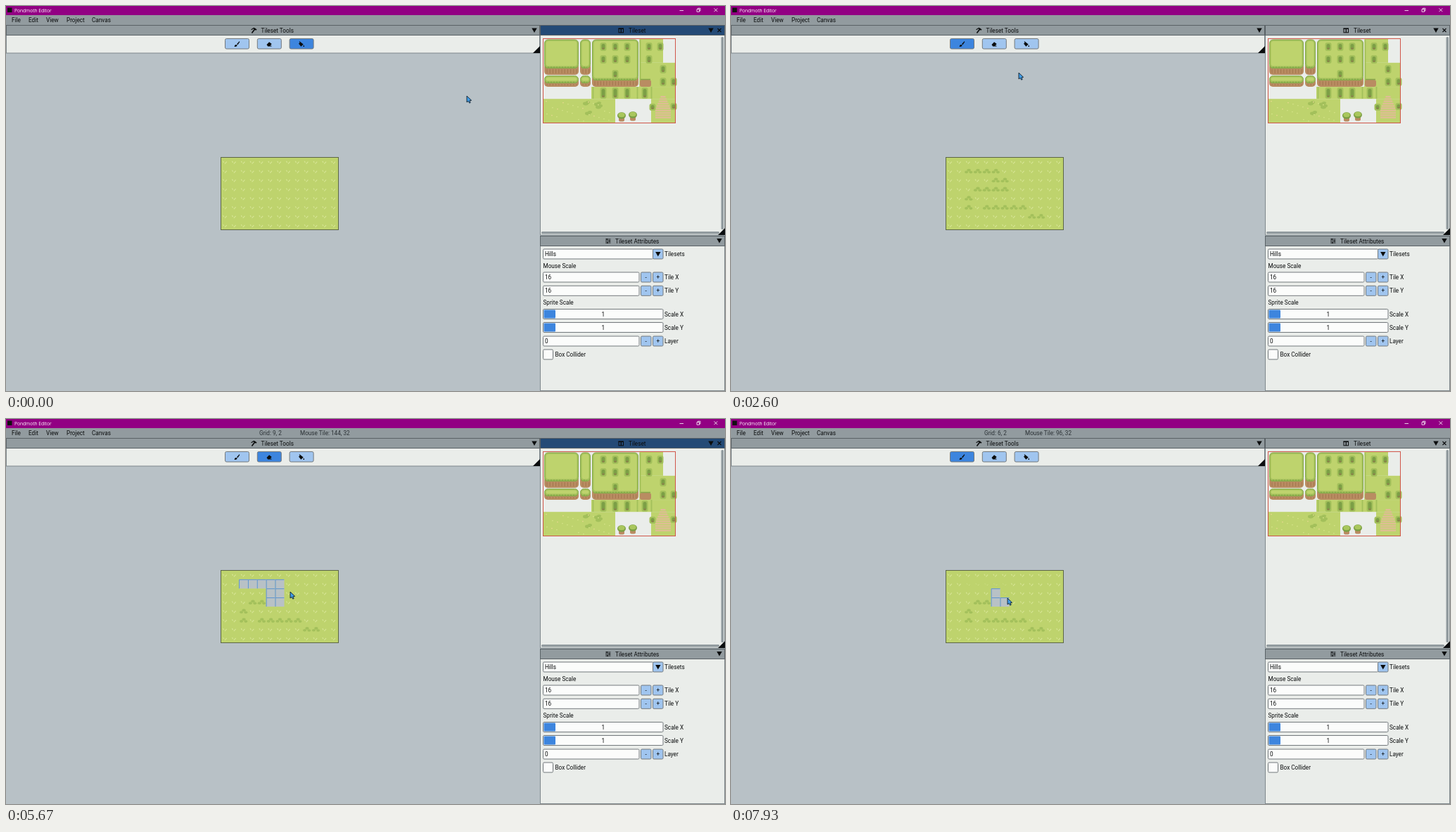
An HTML page for the animation above (8 s loop, 1022 px wide and 548 px high).

```html
<!DOCTYPE html>
<html lang="en">
<head>
<meta charset="utf-8">
<title>Tile editor</title>
<style>
html, body { margin: 0; width: 100%; height: 100%; overflow: hidden; background: #b8c1c6; }
svg { display: block; }
text { font: 8.2px Roboto, sans-serif; fill: #0b0d0e; white-space: pre; }
.title { font: 6.6px "Open Sans", sans-serif; fill: #fff; }
.hint { fill: #2c3236; }
</style>
</head>
<body>
<svg id="stage" width="1022" height="548" viewBox="0 0 1022 548"></svg>
<script>
const STEP = 8000 / 120, STEPS = 120;
const COLS = 13, ROWS = 8, CELL_W = 167 / COLS, CELL_H = 103 / ROWS, MAP_X = 305.5, MAP_Y = 215.5;
const STAGE = '#b8c1c6', BAR = '#929b9f', FOCUS = '#244a76', PANEL = '#eaedea';
const BLUE = '#3d85de', PALE = '#a0c5ef', EDGE = '#5a6266', RIM = '#7f888c', INK = '#0b0d0e';
const GRASS = '#bed36d', SHADE = '#86a94a', LEAF = '#a3c05b', EARTH = '#b98c62';

const rect = (x, y, w, h, fill, more = '') =>
  `<rect x="${x}" y="${y}" width="${w}" height="${h}" fill="${fill}" ${more}/>`;
const path = (d, fill = INK, more = '') => `<path d="${d}" fill="${fill}" ${more}/>`;
const line = (d, color, width = 1) => path(d, 'none', `stroke="${color}" stroke-width="${width}"`);
const oval = (x, y, rx, ry, fill) => `<ellipse cx="${x}" cy="${y}" rx="${rx}" ry="${ry}" fill="${fill}"/>`;
const text = (x, y, s, more = '') => `<text x="${x}" y="${y}" ${more}>${s}</text>`;
const down = (x, y) => path(`M${x - 3.7} ${y - 3}h7.4l-3.7 6.4z`);
const field = (x, y, w, fill = '#fbfcfb', more = '') =>
  rect(x, y - 7, w, 14, fill, `rx="1.5" stroke="#73797c" ${more}`);
const button = (x, y, sign) => field(x, y, 14.5, PALE) +
  text(x + 7.25, y + 3, sign, 'text-anchor="middle"');
const header = (id, x, y, w) => rect(x, y, w, 14, BAR, `id="${id}" stroke="${EDGE}"`);

function titleBar() {
  return rect(0, 0, 1022, 13, '#920083') + rect(2, 2.5, 6.5, 6.5, '#111') +
    text(12, 8.7, 'Pondmoth Editor', 'class="title"') +
    line('M957.5 6.5h5.5M1006.5 3.3l4.8 4.8m0-4.8l-4.8 4.8', '#fff', .8) +
    line('M982 4.6h3.6v3.6H982zM983.3 4.2v-1h3.6v3.7h-1', '#fff', .8) +
    rect(0, 13, 1022, 14, BAR) +
    [[8, 'File'], [32, 'Edit'], [57, 'View'], [86, 'Project'], [122, 'Canvas']]
      .map(([x, s]) => text(x, 23, s)).join('');
}

function toolsPanel() {
  const icons = [
    'M324.7 58q.2-3 2.6-3.1l1.5 1.2q-.6 2.2-4.1 1.9zM328 54.3l3.6-4 .8.8-3 4.2z',
    'M370.5 55l3.6-3.7 3.6 2.6-2.2 2.6h2v1h-5.3z',
    'M416 53.4l1.8-1.3-1.2-1.2.7-.7 5.4 4.4-3.4 3.2zM423 55.4q2 2.5.4 2.7-1.6-.2-.4-2.7z'
  ];
  return rect(.5, 41.5, 758, 25.5, PANEL, `stroke="${RIM}"`) + header('toolsHead', .5, 27.5, 758) +
    path('M348 33.4l4-2.7 2 .7 2.6 2-1.4 1.4-1.2-.7-4 5-1.2-1 3.7-5-.8-.8-2.3 1.8z') +
    text(362.5, 38, 'Tileset Tools') + down(751, 34.5) + path('M749 67l10-10v10z') +
    icons.map((d, i) => rect(311.5 + i * 45.8, 46.5, 34, 14.5, PALE,
      `id="tool${i}" rx="2" stroke="#73797c"`) + path(d)).join('');
}

// Position inside the tile sheet, in tiles of 17 px.
const TW = 187 / 11, TH = 120 / 7;
const tx = c => 764 + c * TW, ty = r => 46.5 + r * TH;

function hill(c, r, w, h) {
  const x = tx(c) + 1, y = ty(r) + 1, W = w * TW - 2, H = h * TH - 1;
  const cliff = h > 1 ? 10 : 6;
  let ridges = '', scallops = `M${x + 2} ${y + H - cliff - 1}`;
  for (let k = x + 4; k < x + W - 2; k += 4.2) ridges += `M${k} ${y + H - cliff + 2}v${cliff - 4}`;
  for (let k = 0; k < Math.floor((W - 4) / 4); k++) scallops += 'q2 3 4 0';
  return rect(x, y + H - cliff - 6, W, cliff + 6, EARTH, 'rx="5"') + line(ridges, '#a3764f', 1) +
    rect(x + .5, y + .5, W - 1, H - cliff, LEAF, `rx="5" stroke="${SHADE}"`) +
    rect(x + 2.5, y + 2.5, W - 5, H - cliff - 5, GRASS, 'rx="3.5"') + line(scallops, SHADE, 1.3);
}

const ground = (c, r, w, h, fill = GRASS) => rect(tx(c), ty(r), w * TW, h * TH, fill);
const hedge = (x, y, h = 12) => rect(x - 4.5, y - h / 2, 9, h, LEAF, 'rx="3"') +
  rect(x - 2.5, y - h / 2 + 2, 5, h - 4, '#7c9f46', 'rx="2"') +
  rect(x - 1.5, y + h / 2 - 4.5, 3, 2, '#8d7f4b');
const pot = (x, y) => rect(x - 4, y + 1, 8, 6.5, EARTH, 'rx="2.5"') + oval(x, y - 1, 6, 4.8, '#7b9f44') +
  oval(x, y - 2, 4.6, 3.2, '#a9c75c');

function tileSheet() {
  let s = rect(764, 46.5, 187, 120, PANEL) +
    hill(0, 0, 3, 3) + hill(3, 0, 1, 3) + hill(0, 3, 3, 1) + hill(3, 3, 1, 1) +
    hill(4, 0, 4, 4) + ground(8, 0, 2, 2) + ground(8, 2, 3, 2) + ground(4, 4, 7, 1) +
    ground(0, 5, 6, 2) + ground(9, 5, 2, 2);
  for (const x of [849, 866, 883]) for (const y of [58, 76]) s += hedge(x, y);
  for (const x of [849, 866, 883, 908]) s += hedge(x, 124, 16);
  for (const [x, y] of [[866, 97], [914, 58], [930, 58], [914, 76], [934, 90], [934, 108], [949, 108]])
    s += hedge(x, y);
  s += line('M899.8 47v67', PANEL, 1.2) + line('M834.5 115v17M897.5 115v17M917.5 115v17M901.5 48v65', LEAF, 1.8) +
    rect(901, 105, 16, 10, EARTH, 'rx="3"') + line('M902 104.5h14', SHADE, 1.6);
  for (const [x, y] of [[824, 139], [840, 140], [827, 153], [842, 144]])
    s += oval(x, y, 4, 2.4, LEAF) + oval(x + 3, y - 2, 3, 2, LEAF);
  for (let i = 0; i < 26; i++)
    s += rect(767 + (i * 37) % 96, 135 + (i * 17) % 29, 1.8, 1.3, i % 4 ? '#d2e084' : '#e2d88c');
  s += pot(875, 157) + pot(891, 156);
  for (let i = 0; i < 10; i++) {
    const w = Math.min(22, 7 + i * 2.8);
    s += rect(934 - w / 2, 128 + i * 3.3, w, 2.2, '#dfbd94');
  }
  s += hedge(919, 144, 10) + hedge(949, 143, 10);
  return s + rect(763.5, 46.5, 188, 120, 'none', 'stroke="#d0564a"');
}

function sheetPanel() {
  return rect(759.5, 41.5, 262, 284.5, PANEL, `stroke="${RIM}"`) + header('sheetHead', 759.5, 27.5, 262) +
    rect(871, 32, 6.5, 5.8, 'none', `stroke="${INK}"`) + line('M870.5 32.3h7.5M874.3 32v6', INK, 1.3) +
    text(885, 38, 'Tileset') + down(1002, 34.5) +
    line('M1011.5 32l5 5m0-5l-5 5', INK, 1.1) +
    rect(1016.5, 44, 3.5, 274, BAR, 'rx="1.5"') + rect(761, 321, 253, 3.5, BAR, 'rx="1.5"') +
    path('M1012 326l10-10v10z') + tileSheet();
}

function attributesPanel() {
  const number = (y, value, label) => field(763.5, y, 136.5) + text(766, y + 3, value) +
    button(902.5, y, '-') + button(919.5, y, '+') + text(936, y + 3, label);
  const slider = (y, label) => field(763.5, y, 170.5) + rect(764.5, y - 6, 16.5, 12, BLUE, 'rx="1"') +
    text(848.7, y + 3, '1', 'text-anchor="middle"') + text(936, y + 3, label);
  return rect(759.5, 341.5, 262, 206, PANEL, `stroke="${RIM}"`) + header('attrHead', 759.5, 327.5, 262) +
    line('M852 332h7.5M852 334.5h7.5M852 337h7.5', INK, .9) +
    rect(853.5, 331, 1.5, 2, INK) + rect(857, 333.5, 1.5, 2, INK) + rect(854, 336, 1.5, 2, INK) +
    text(866, 337.5, 'Tileset Attributes') + down(1014, 334) +
    field(763.5, 353, 156.5) + text(766, 356, 'Hills') + field(919.5, 353, 14.5, PALE) +
    down(926.8, 353) + text(936, 356, 'Tilesets') +
    text(763.5, 373, 'Mouse Scale') + number(386, '16', 'Tile X') + number(405.3, '16', 'Tile Y') +
    text(763.5, 425, 'Sprite Scale') + slider(438.5, 'Scale X') + slider(457.5, 'Scale Y') +
    number(477, '0', 'Layer') + field(763.5, 496, 14) + text(780.5, 499, 'Box Collider');
}

const tiles = {
  grass: line('M3 5.4l1.3 2M5.5 9.2l2.8-3', '#d7e596', 1.1),
  bush: oval(3.4, 8, 2.5, 1.8, LEAF) + oval(6.9, 5.2, 2.7, 1.9, LEAF) + oval(9.7, 8.2, 2.5, 1.8, LEAF),
  plain: line('M4 6l1 1M7 8.5l1.3-1.3', '#d3e38f', 1),
  clear: rect(0, 0, CELL_W + .1, CELL_H + .1, STAGE) + line(`M${CELL_W} .4H.4V${CELL_H}`, '#5490d2', .9)
};

// Brush strokes: tile, first step, last step, row, first column, last column.
const strokes = [
  ['bush', 20, 23, 1, 2, 5], ['bush', 24, 25, 2, 5, 6], ['bush', 26, 28, 3, 6, 3],
  ['bush', 29, 29, 4, 2, 2], ['bush', 30, 30, 5, 2, 2], ['bush', 31, 33, 5, 4, 8],
  ['bush', 34, 35, 6, 9, 10],
  ['clear', 53, 57, 1, 2, 6], ['clear', 59, 60, 2, 6, 5], ['clear', 62, 63, 3, 6, 5],
  ['plain', 112, 116, 1, 2, 6], ['plain', 118, 118, 2, 6, 6]
];

const center = (c, r) => [MAP_X + (c + .5) * CELL_W, MAP_Y + (r + .5) * CELL_H];

// Pointer stops between the strokes: step, x, y.
const stops = [
  [0, 655, 128], [1, 648, 126], [4, 530, 98], [7, 385, 67], [9, 335, 58], [11, 319, 56], [15, 319, 56],
  [17, 322, 100], [37, 430, 170], [39, 409, 95], [41, 380, 60], [42, 374, 54], [45, 374, 55],
  [48, 362, 120], [51, 340, 215], [64, 380, 263], [66, 384, 262], [69, 470, 235], [73, 715, 160],
  [76, 770, 142], [80, 770, 142], [82, 610, 195], [84, 428, 244], [85, 404, 246], [88, 378, 248],
  [92, 376, 248], [95, 365, 190], [99, 338, 70], [101, 333, 53], [102, 333, 52], [104, 333, 52],
  [107, 328, 110], [110, 333, 215], [119, 393, 255]
];
for (const [, a, b, row, from, to] of strokes) {
  stops.push([a, ...center(from, row)]);
  if (b > a) stops.push([b, ...center(to, row)]);
}
stops.sort((a, b) => a[0] - b[0]);

function pointer(step) {
  const next = stops.findIndex(s => s[0] >= step);
  const b = stops[next], a = stops[Math.max(0, next - 1)];
  const k = b[0] > a[0] ? (step - a[0]) / (b[0] - a[0]) : 1;
  return [a[1] + (b[1] - a[1]) * k, a[2] + (b[2] - a[2]) * k];
}

// The last entry whose step has been reached is in force.
const latest = (table, step) => table.filter(e => e[0] <= step).pop()[1];
const tools = [[0, 2], [15, 0], [44, 1], [104, 0]];
const focus = [[0, 'sheetHead'], [14, 'toolsHead'], [20, ''], [43, 'toolsHead'], [53, ''],
  [80, 'sheetHead'], [89, ''], [103, 'toolsHead'], [112, '']];

const $ = id => document.getElementById(id);
$('stage').innerHTML =
  '<defs>' + Object.entries(tiles).map(([id, art]) => `<g id="${id}">${art}</g>`).join('') + '</defs>' +
  rect(0, 0, 1022, 548, STAGE) + titleBar() + text(360, 23, '', 'id="grid" class="hint"') +
  text(418, 23, '', 'id="tile" class="hint"') + toolsPanel() + sheetPanel() + attributesPanel() +
  rect(MAP_X, MAP_Y, 167, 103, GRASS) +
  `<g id="map" transform="translate(${MAP_X} ${MAP_Y})"></g>` +
  rect(MAP_X, MAP_Y, 167, 103, 'none', 'stroke="#5c6646"') +
  path('M0 0V9L2.1 7.4 3.8 10.2 5.2 9.4 3.9 6.8 6.6 6.3Z', '#3f9be6', 'id="cursor" stroke="#10202c" stroke-width=".9"');

function drawMap(step) {
  const cells = Array(COLS * ROWS).fill('grass');
  for (const [kind, a, b, row, from, to] of strokes) {
    if (step < a) continue;
    const done = b > a ? Math.min(1, (step - a) / (b - a)) : 1;
    const reach = Math.round((to - from) * done), dir = Math.sign(to - from);
    for (let i = 0; i <= Math.abs(reach); i++) cells[row * COLS + from + i * dir] = kind;
  }
  $('map').innerHTML = cells.map((kind, i) =>
    `<use href="#${kind}" x="${i % COLS * CELL_W}" y="${Math.floor(i / COLS) * CELL_H}"/>`).join('');
}

function draw(step) {
  const [x, y] = pointer(step);
  $('cursor').setAttribute('transform', `translate(${x} ${y})`);
  drawMap(step);

  // The readout trails the pointer by one step.
  const [px, py] = pointer(Math.max(0, step - 1));
  const col = Math.floor((px - MAP_X) / CELL_W), row = Math.floor((py - MAP_Y) / CELL_H);
  const inside = col >= 0 && col < COLS && row >= 0 && row < ROWS;
  $('grid').textContent = inside ? `Grid: ${col}, ${row}` : '';
  $('tile').textContent = inside ? `Mouse Tile: ${col * 16}, ${row * 16}` : '';

  const active = latest(tools, step), focused = latest(focus, step);
  for (let i = 0; i < 3; i++) {
    const left = 311.5 + i * 45.8;
    const hover = x >= left && x <= left + 34 && y >= 46 && y <= 61;
    $('tool' + i).setAttribute('fill', hover || i === active ? BLUE : PALE);
  }
  for (const id of ['toolsHead', 'sheetHead'])
    $(id).setAttribute('fill', id === focused ? FOCUS : BAR);
}

const start = performance.now();
let shown = -1;
function tick() {
  const step = Math.floor((performance.now() - start + 4) / STEP) % STEPS;
  if (step !== shown) draw(shown = step);
  requestAnimationFrame(tick);
}
tick();
</script>
</body>
</html>
```
